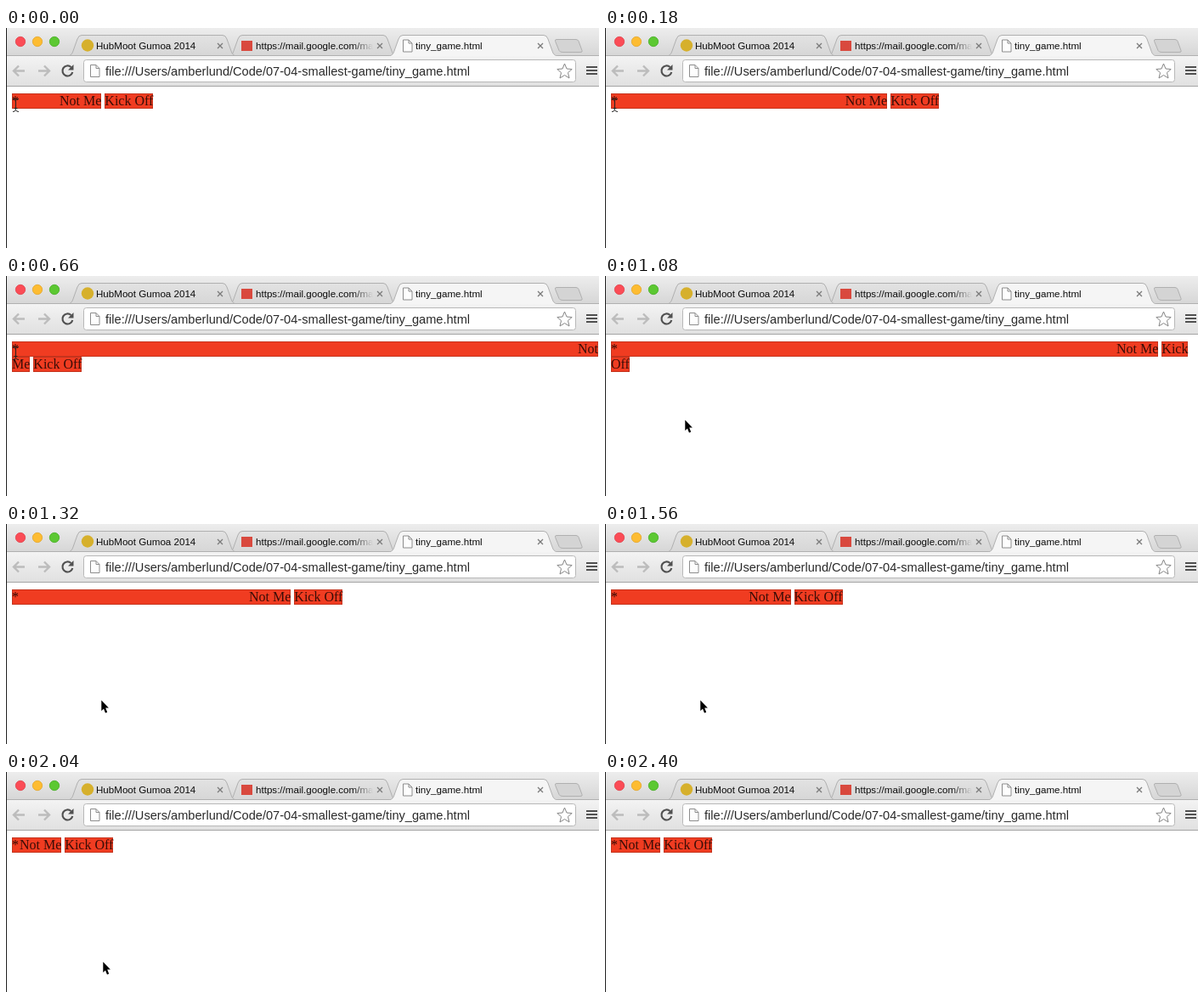
An HTML page for the animation above (3000 ms loop, 698 by 259 pixels).

```html
<!DOCTYPE html>
<html lang="en">
<head>
<meta charset="utf-8">
<title>tiny_game.html</title>
<style>
  html, body { margin: 0; width: 100%; height: 100%; overflow: hidden; background: #fff; }
  body { position: relative; }
  svg { position: absolute; left: 0; top: 0; }
  .ui { font: 11.6px "Liberation Sans", Arial, sans-serif; fill: #0c0c0c; }
  .url { font-size: 14.6px; fill: #2a2a2a; }
  .line { fill: none; stroke: #a4a4a4; }

  .game {
    position: absolute; left: 7px; top: 77px; width: 690px;
    font: 16px/18px "Liberation Serif", "Times New Roman", serif;
    color: #3a0d07;
  }
  .btn { background: #f03c21; box-shadow: inset 0 0 0 1px #c5331d; padding-bottom: 1px; }

  .gap, .cursor, .beam, .arrow { animation: 3s infinite; }
  .gap { animation-name: gap; }
  .cursor { animation-name: move; }
  .beam { animation-name: beam; animation-timing-function: step-end; }
  .arrow { animation-name: arrow; animation-timing-function: step-end; }

  /* One step is 60ms, or 2% of the loop. */
  @keyframes gap {
    0%   { padding-left: 48px;  animation-timing-function: steps(7); }
    14%  { padding-left: 561px; animation-timing-function: steps(1); }
    16%  { padding-left: 634px; animation-timing-function: steps(1); }
    18%  { padding-left: 658px; animation-timing-function: steps(1); }
    34%  { padding-left: 658px; animation-timing-function: steps(1); }
    36%  { padding-left: 587px; animation-timing-function: steps(4); }
    44%  { padding-left: 271px; animation-timing-function: steps(5); }
    54%  { padding-left: 125px; animation-timing-function: steps(3); }
    60%  { padding-left: 16px;  animation-timing-function: steps(1); }
    62%, 100% { padding-left: 1px; }
  }
  @keyframes move {
    0%, 22% { transform: translate(11px, 91px);  animation-timing-function: steps(7); }
    36%     { transform: translate(94px, 169px); animation-timing-function: steps(4); }
    44%, 60% { transform: translate(112px, 207px); animation-timing-function: steps(4); }
    68%, 100% { transform: translate(114px, 223px); }
  }
  @keyframes beam { 0% { opacity: 1; } 24%, 100% { opacity: 0; } }
  @keyframes arrow { 0% { opacity: 0; } 24% { opacity: 1; } 74%, 100% { opacity: 0; } }
</style>
</head>
<body>
<svg width="698" height="259" viewBox="0 0 698 259">
  <defs>
    <linearGradient id="strip" x2="0" y2="1">
      <stop stop-color="#ededed"/><stop offset="1" stop-color="#d6d6d6"/>
    </linearGradient>
    <linearGradient id="idle" x2="0" y2="1">
      <stop stop-color="#e2e2e2"/><stop offset="1" stop-color="#d6d6d6"/>
    </linearGradient>
    <linearGradient id="bar" x2="0" y2="1">
      <stop stop-color="#f3f3f3"/><stop offset="1" stop-color="#e0e0e0"/>
    </linearGradient>
    <linearGradient id="fade" gradientUnits="userSpaceOnUse" x1="408" x2="432">
      <stop stop-color="#0c0c0c"/><stop offset="1" stop-color="#0c0c0c" stop-opacity="0"/>
    </linearGradient>
    <path id="tab" d="M0 33C4 32 5 30 6 27L11 13Q12.500 8.500 16 8.500H182Q185.500 8.500 187 13L192 27C193 30 194 32 198 33"/>
    <path id="close" d="M-3-3 3 3M3-3-3 3" stroke="#7a7a7a" stroke-width="1.300"/>
    <path id="page" d="M.5.500H7L11 4.500V14.500H.5ZM7 .5V4.500H11" fill="#fdfdfd" stroke="#8c8c8c"/>
    <path id="back" d="M8-6 2 0 8 6M2 0H15" fill="none" stroke="#bcbcbc" stroke-width="2.400"/>
  </defs>

  <rect width="698" height="33" fill="url(#strip)"/>
  <circle cx="17" cy="16" r="5.700" fill="#fb4c56" stroke="#e0404a" stroke-width=".8"/>
  <circle cx="37" cy="16" r="5.700" fill="#fdbc32" stroke="#e3a62a" stroke-width=".8"/>
  <circle cx="57" cy="16" r="5.700" fill="#5cc832" stroke="#45ae22" stroke-width=".8"/>

  <g stroke="#b0b0b0">
    <use href="#tab" x="262" fill="url(#idle)"/>
    <use href="#tab" x="73" fill="url(#idle)"/>
    <path d="M0 32.500H698"/>
    <use href="#tab" x="451" fill="#f5f5f5"/>
    <path d="M648 13.500H671Q673 13.500 674 15.500L678 26.500Q679 28.500 676 28.500H655Q652 28.500 651 26.500L646.500 15.500Q646 13.500 648 13.500Z" fill="#d4d4d4"/>
  </g>
  <rect y="33" width="698" height="36" fill="url(#bar)"/>
  <path d="M0 68.500H698" class="line"/>

  <circle cx="96" cy="20.500" r="7.200" fill="#d6b02c"/>
  <rect x="277" y="15" width="13" height="12" fill="#d9493e"/>
  <use href="#page" x="467" y="13.500"/>
  <g class="ui">
    <text x="106" y="25">HubMoot Gumoa 2014</text>
    <text x="294" y="25" fill="url(#fade)">https://mail.google.com/ma</text>
    <text x="482" y="25">tiny_game.html</text>
  </g>
  <use href="#close" x="252" y="21"/>
  <use href="#close" x="440" y="21"/>
  <use href="#close" x="629" y="21"/>

  <use href="#back" x="7" y="50.500"/>
  <use href="#back" transform="translate(53 50.500) scale(-1 1)"/>
  <path d="M76.500 46A6 6 0 1 0 78.300 52" fill="none" stroke="#505050" stroke-width="2.200"/>
  <path d="M79.500 43V49.500H73Z" fill="#505050"/>
  <rect x="91.500" y="37.500" width="579" height="26" rx="3" fill="#fff" stroke="#b8b8b8"/>
  <use href="#page" x="99" y="43"/>
  <text x="117" y="56" class="ui url">file:///Users/amberlund/Code/07-04-smallest-game/tiny_game.html</text>
  <path d="M657.500 42 660 48 666.200 48.500 661.500 52.600 663 59 657.500 55.500 652 59 653.500 52.600 648.800 48.500 655 48Z" fill="#fff" stroke="#858585" stroke-linejoin="round"/>
  <path d="M683 46H696M683 50H696M683 54H696" stroke="#505050" stroke-width="2"/>
  <path d="M.5 0V259" stroke="#222"/>
</svg>

<div class="game"><span class="btn">*<span class="gap">Not</span> Me</span> <span class="btn">Kick Off</span></div>

<svg width="698" height="259" viewBox="0 0 698 259">
  <g class="cursor">
    <path class="beam" d="M-3-7.500Q0-7.500 .5-5.500Q1-7.500 4-7.500M.5-5.500V5.500M-3 7.500Q0 7.500 .5 5.500Q1 7.500 4 7.500M-1.500 3.500H2.500" fill="none" stroke="#222"/>
    <path class="arrow" d="M.3 .5V13L3 10.400 5 15.400 7.200 14.500 5.200 9.500H8.900Z" stroke="#fff" stroke-width="2" paint-order="stroke"/>
  </g>
</svg>
</body>
</html>
```
